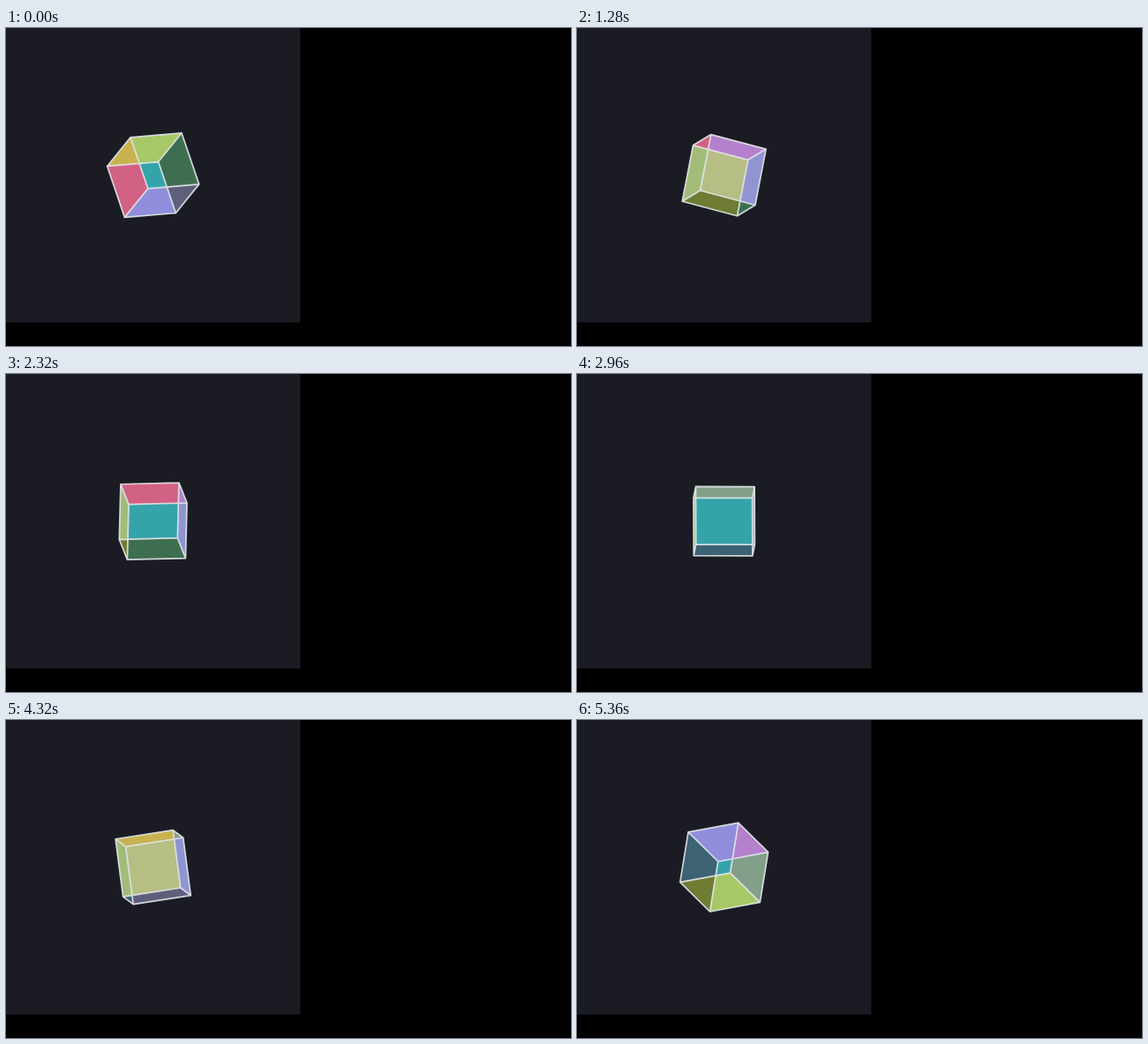
These frames come from a looping animation (640x360 px, 5.44 s). An HTML page with a canvas:

```html
<!DOCTYPE html>
<html lang="en">
<head>
<meta charset="utf-8">
<title>Glass cube</title>
<style>
  html, body { margin: 0; width: 100%; height: 100%; overflow: hidden; background: #000; }
  canvas { display: block; }
</style>
</head>
<body>
<canvas id="stage" width="640" height="360"></canvas>
<script>
const ctx = document.getElementById('stage').getContext('2d');
const LOOP = 5440, STEP = 80;
const PANEL = 1000 / 3, MID = PANEL / 2, HALF = PANEL / 10;

// Faces: 0 +x, 1 -x, 2 +y, 3 -y, 4 +z, 5 -z. A region's tint depends on the two faces it shows.
const TINT = {
  '01': '#b6be84', '02': '#5f5f7c', '03': '#b480cc', '04': '#9095d2', '05': '#908edc',
  '12': '#6e7c34', '13': '#c8b250', '14': '#a6c866', '15': '#a2bc78',
  '23': '#96645a', '24': '#3e6e50', '25': '#3c6274',
  '34': '#829f8a', '35': '#d26284', '45': '#34a4aa'
};

// Rotation by angle about an axis in the picture plane; the axis turns as the angle falls.
function rotation(ms) {
  const angle = (141 - ms * 360 / 7000) * Math.PI / 180;
  const c = Math.cos(angle), s = Math.sin(angle), k = 1 - c;
  const nx = -c, ny = s;
  return [
    [c + nx * nx * k, nx * ny * k, ny * s],
    [nx * ny * k, c + ny * ny * k, -nx * s],
    [-ny * s, nx * s, c]
  ];
}

function project(m, v) {
  const at = row => MID + HALF * (row[0] * v[0] + row[1] * v[1] + row[2] * v[2]);
  return [at(m[0]), at(m[1])];
}

function corners(m, face) {
  const axis = face >> 1, sign = face % 2 ? -1 : 1;
  return [[-1, -1], [1, -1], [1, 1], [-1, 1]].map(([p, q]) => {
    const v = [];
    v[axis] = sign;
    v[(axis + 1) % 3] = p;
    v[(axis + 2) % 3] = q;
    return project(m, v);
  });
}

function trace(points) {
  ctx.beginPath();
  points.forEach(([x, y]) => ctx.lineTo(x, y));
  ctx.closePath();
}

function drawRegion(m, near, far) {
  ctx.save();
  trace(corners(m, near));
  ctx.clip();
  trace(corners(m, far));
  ctx.fillStyle = TINT[[near, far].sort().join('')];
  ctx.fill();
  ctx.restore();
}

function drawEdges(m) {
  ctx.beginPath();
  for (let axis = 0; axis < 3; axis++) {
    for (const p of [-1, 1]) for (const q of [-1, 1]) {
      const ends = [-1, 1].map(e => {
        const v = [];
        v[axis] = e;
        v[(axis + 1) % 3] = p;
        v[(axis + 2) % 3] = q;
        return project(m, v);
      });
      ctx.moveTo(...ends[0]);
      ctx.lineTo(...ends[1]);
    }
  }
  ctx.lineWidth = 1.7;
  ctx.lineCap = 'round';
  ctx.strokeStyle = 'rgba(228, 232, 234, .9)';
  ctx.stroke();
}

function draw(ms) {
  ctx.fillStyle = '#000';
  ctx.fillRect(0, 0, 640, 360);
  ctx.fillStyle = '#1b1b24';
  ctx.fillRect(0, 0, PANEL, PANEL);

  const m = rotation(ms);
  const near = [0, 1, 2].map(i => 2 * i + (m[2][i] > 0 ? 0 : 1));
  const far = near.map(face => face ^ 1);
  near.forEach(a => far.forEach(b => drawRegion(m, a, b)));
  drawEdges(m);
}

const start = performance.now();
function tick() {
  const t = (performance.now() - start) % LOOP;
  draw(Math.floor(t / STEP) * STEP);
  requestAnimationFrame(tick);
}
tick();
</script>
</body>
</html>
```
